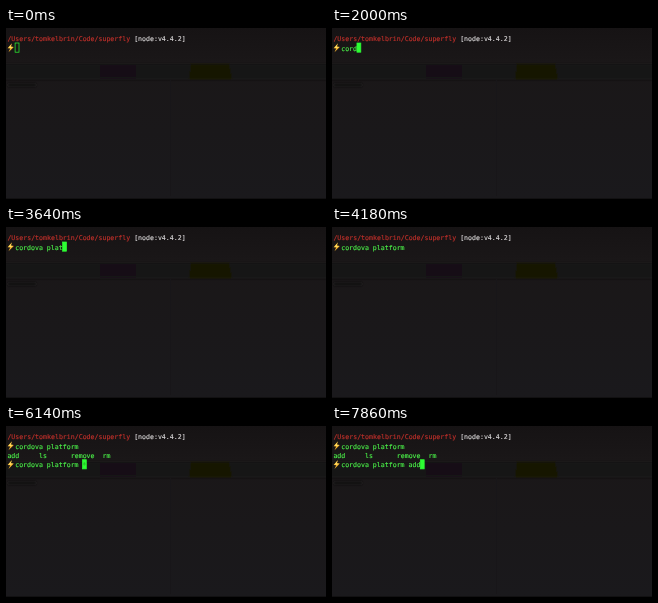
Write an HTML page that moves like this. It is 320 by 171 pixels and loops after 8000 ms.

```html
<!DOCTYPE html>
<html lang="en">
<head>
<meta charset="utf-8">
<title>Terminal</title>
<style>
  html, body { margin: 0; width: 100%; height: 100%; overflow: hidden; background: #1a181b; }
  svg { display: block; width: 100vw; height: 100vh; }
  text {
    font: 6.58px "DejaVu Sans Mono", monospace;
    fill: #4dfb4b;
    stroke: #4dfb4b;
    stroke-width: .12px;
    white-space: pre;
    text-rendering: geometricPrecision;
  }
  .path { fill: #c5312b; stroke: #c5312b; }
  .node { fill: #e0dedf; stroke: #e0dedf; }
</style>
</head>
<body>
<svg viewBox="0 0 320 171">
  <defs>
    <linearGradient id="shade" x2="0" y2="1">
      <stop offset="0" stop-color="#161314"/>
      <stop offset=".2" stop-color="#1a1718"/>
      <stop offset="1" stop-color="#1a191c"/>
    </linearGradient>
    <filter id="soft"><feGaussianBlur stdDeviation=".8"/></filter>
    <g id="bolt">
      <path d="M5.9 15.3 1.6 20.2 4.2 20.5 2.5 24.2 7.8 18.9 5 18.6Z" fill="#f6b52e"/>
      <path d="M5.7 15.9 2.5 19.8 5 20 6.8 18.9 4.4 18.8Z" fill="#ffe36a"/>
    </g>
  </defs>

  <!-- translucent window backdrop -->
  <rect width="320" height="171" fill="url(#shade)"/>
  <g filter="url(#soft)">
    <rect x="-5" y="36" width="330" height="15.5" fill="#141213"/>
    <rect x="94" y="38" width="36" height="11" fill="#171012"/>
    <path d="M185 36H223L226 51H183Z" fill="#161306"/>
    <rect x="2" y="55.5" width="28" height="3" fill="#171517"/>
  </g>
  <path d="M164.5 52V168" stroke="#181619"/>
  <path d="M0 170.5H320" stroke="#121112"/>

  <text x="1.4" y="13.4"><tspan class="path">/Users/tomkelbrin/Code/superfly</tspan><tspan class="node"> [node:v4.4.2]</tspan></text>

  <use href="#bolt"/>
  <text id="first" x="9.2" y="22.7"></text>

  <g id="output">
    <text x="1.4" y="32.1">add     ls      remove  rm</text>
    <use href="#bolt" y="18.7"/>
    <text id="second" x="9.2" y="41.4"></text>
  </g>

  <g id="cursor">
    <rect id="block" x=".3" y=".3" width="3.9" height="9.2" stroke="#2dfd33" stroke-width=".7"/>
    <path id="bell" d="M.9 5.4Q1.4 4.8 1.4 3.6A.85.85 0 0 1 3.1 3.6Q3.1 4.8 3.6 5.4ZM1.8 5.8H2.7V6.4H1.8Z" fill="#0c3a10"/>
  </g>
</svg>
<script>
  const LOOP = 8000, CELL = 3.96, LEFT = 8.8, TOP = 14.7, PITCH = 9.35;
  const LIST_AT = 5400, BELL_MS = 1050;
  const command = 'cordova platform ', word = 'add';

  // time of each keystroke
  const keys = [1450, 1640, 1820, 1960, 2180, 2230, 2320, 2360,
                3000, 3050, 3180, 3640, 3680, 3680, 3730, 3730, 3770];
  const wordKeys = [7410, 7590, 7770];
  const hidden = [[640, 1270], [2640, 3000], [4180, 4680], [6590, 7180]];
  const bells = [4910, LIST_AT];

  const $ = id => document.getElementById(id);
  const [first, second, output, cursor, block, bell] =
    ['first', 'second', 'output', 'cursor', 'block', 'bell'].map($);

  const typed = (text, times, t) => text.slice(0, times.filter(k => k <= t).length);
  const setText = (el, s) => { if (el.textContent !== s) el.textContent = s; };

  function draw(t) {
    const listed = t >= LIST_AT;
    const top = typed(command, keys, t);
    const bottom = command + typed(word, wordKeys, t);
    setText(first, top);
    setText(second, bottom);
    output.style.visibility = listed ? 'visible' : 'hidden';

    const col = (listed ? bottom : top).length;
    const y = TOP + (listed ? 2 * PITCH : 0);
    cursor.setAttribute('transform', `translate(${LEFT + col * CELL} ${y})`);
    const off = hidden.some(([a, b]) => t >= a && t < b);
    cursor.style.visibility = off ? 'hidden' : 'visible';
    block.setAttribute('fill', t < 50 ? 'none' : '#2dfd33');

    const rung = bells.filter(b => b <= t).pop();
    bell.style.opacity = rung === undefined ? 0 : Math.max(0, 1 - (t - rung) / BELL_MS);
  }

  const start = performance.now();
  function tick() {
    draw((performance.now() - start) % LOOP);
    requestAnimationFrame(tick);
  }
  tick();
</script>
</body>
</html>
```
